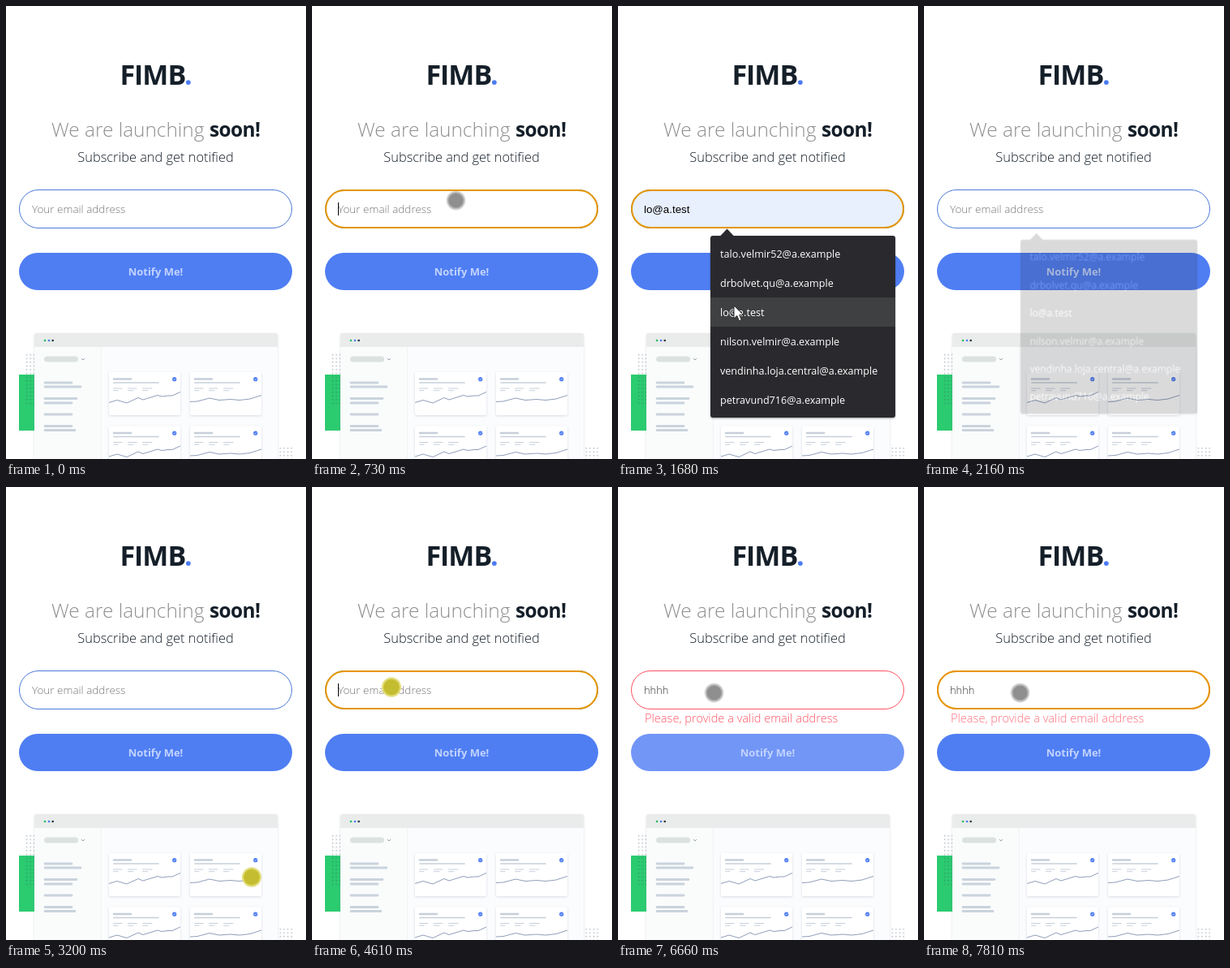
Recreate the animation shown at these times as an HTML page. Size 370 by 558 pixels, loop 8 s.

```html
<!DOCTYPE html>
<html lang="en">
<head>
<meta charset="utf-8">
<title>Launching soon</title>
<style>
html, body { margin: 0; width: 100%; height: 100%; overflow: hidden; background: #fff; }
svg { display: block; width: 370px; height: 558px; font-family: "Open Sans", sans-serif; }

.brand { font-weight: 700; font-size: 34px; letter-spacing: -1px; text-anchor: middle; fill: #151f29; }
.brand tspan { fill: #4c7bf3; }
.light { font-weight: 340; }
.lead { font-size: 24.4px; fill: #8e8e8e; }
.soon { font-size: 24.4px; font-weight: 700; letter-spacing: -.6px; fill: #151f29; }
.sub { font-size: 16.4px; text-anchor: middle; fill: #151f29; }
.hint { font-size: 13.5px; fill: #757575; }
.typed { font-size: 12.9px; fill: #333; }
.preview { font: 13.3px "Liberation Sans", Arial, sans-serif; }
.error { font-size: 14.6px; fill: #ff5263; }
.label { font-size: 13px; font-weight: 700; text-anchor: middle; fill: #c2d3ff; }
.popup text { font-size: 12.6px; fill: #fff; }

/* Hard switches */
.hint, .autofill, .opt1, .opt2, .opt3, .focus, .caret, .typing, .ring, .arrow, .press {
  animation: 8s step-end infinite;
}
.hint { animation-name: hint; }
.autofill { animation-name: autofill; }
.opt1 { animation-name: opt1; }
.opt2 { animation-name: opt2; }
.opt3 { animation-name: opt3; }
.focus { animation-name: focus; }
.caret { animation-name: caret; }
.typing { animation-name: typing; }
.ring { animation-name: ring; }
.arrow { animation-name: arrow; }
.press { animation-name: press; }

/* Smooth changes */
.field { animation: field 8s linear infinite; }
.error { animation: error 8s linear infinite; }
.button { animation: button 8s linear infinite; }
.popup { animation: popup 8s linear infinite; transform-origin: 228px 395px; }
.ring-path { animation: ring-path 8s ease-in-out infinite; }
.arrow-path { animation: arrow-path 8s linear infinite; }

@keyframes hint { 0%, 23.75% { opacity: 1 } 15%, 59.4%, 100% { opacity: 0 } }
@keyframes autofill { 0%, 23.75%, 100% { opacity: 0 } 15% { opacity: 1 } }
@keyframes opt1 { 0%, 16.9%, 100% { opacity: 0 } 15% { opacity: 1 } }
@keyframes opt2 { 0%, 19%, 100% { opacity: 0 } 16.9% { opacity: 1 } }
@keyframes opt3 { 0%, 23.75%, 100% { opacity: 0 } 19% { opacity: 1 } }
@keyframes focus { 0%, 26.1%, 67.8%, 100% { opacity: 0 } 8.2%, 57.55%, 91.3% { opacity: 1 } }
@keyframes caret {
  0%, 14.4% { opacity: 0; transform: none }
  8.2%, 57.55% { opacity: 1; transform: none }
  59.4% { opacity: 1; transform: translateX(7.6px) }
  60.5% { opacity: 1; transform: translateX(15.2px) }
  61.6% { opacity: 1; transform: translateX(22.8px) }
  62.7%, 91.3% { opacity: 1; transform: translateX(30px) }
  63.9%, 97.6%, 100% { opacity: 0; transform: translateX(30px) }
}
@keyframes typing {
  0% { width: 0 }
  59.4% { width: 7.8px }
  60.5% { width: 15.5px }
  61.6% { width: 23.2px }
  62.7%, 100% { width: 60px }
}
@keyframes ring { 0%, 14.4%, 26.2%, 100% { opacity: 0 } 2.4%, 23.75%, 28.8% { opacity: 1 } }
@keyframes arrow { 0%, 23.75%, 100% { opacity: 0 } 14.4% { opacity: 1 } }
@keyframes press {
  0%, 9%, 41.6%, 59.2%, 68.7%, 91.3%, 100% { opacity: 0 }
  7.4%, 40%, 57.55%, 67%, 89.85% { opacity: 1 }
}
@keyframes field { 0%, 68.7% { stroke: #4c7bd8 } 72.4%, 100% { stroke: #ff5263 } }
@keyframes error {
  0%, 68.7% { opacity: 0 }
  72.4%, 91.3% { opacity: 1 }
  95%, 100% { opacity: .85 }
}
@keyframes button {
  0%, 68.7%, 95%, 100% { fill: #4f7ef3 }
  72.4%, 91.3% { fill: #7296f6 }
}
@keyframes popup {
  0%, 10% { opacity: 0; transform: scale(.95) }
  11.6%, 26.1% { opacity: 1; transform: none }
  27% { opacity: .18; transform: scale(.956) }
  27.6%, 100% { opacity: 0; transform: scale(.95) }
}
@keyframes ring-path {
  0%, 2.4% { transform: translate(270px, 345px) }
  6.6%, 12.5% { transform: translate(177.5px, 239.5px) }
  14.4% { transform: translate(170px, 283px) }
  23.75% { transform: translate(110px, 362px); animation-timing-function: linear }
  24.2% { transform: translate(92px, 358px); animation-timing-function: linear }
  25.5% { transform: translate(3px, 288px); animation-timing-function: linear }
  26.2%, 28.8% { transform: translate(-15px, 280px) }
  32%, 32.8% { transform: translate(165px, 334px); animation-timing-function: ease-in }
  34.6% { transform: translate(252px, 385px); animation-timing-function: ease-out }
  37.2%, 43% { transform: translate(303px, 480.5px) }
  44.2% { transform: translate(311px, 498px) }
  47.6%, 60.2% { transform: translate(98px, 246.5px) }
  64.6%, 70% { transform: translate(138px, 356px) }
  76.5%, 80.8% { transform: translate(138px, 341px) }
  83.1%, 100% { transform: translate(118.5px, 253.5px) }
}
@keyframes arrow-path {
  0%, 14.4% { transform: translate(170px, 283px) }
  16.9% { transform: translate(162px, 323px) }
  19% { transform: translate(150px, 359px) }
  21%, 22.6% { transform: translate(143px, 369px) }
  23.75%, 100% { transform: translate(114px, 363px) }
}
</style>
</head>
<body>
<svg viewBox="0 0 370 558">
  <defs>
    <pattern id="dots" x="24" y="428" width="4.6" height="4.6" patternUnits="userSpaceOnUse">
      <circle cx="1.5" cy="1.5" r=".8" fill="#33495a" opacity=".4"/>
    </pattern>
    <clipPath id="typing"><rect class="typing" x="32" y="238" width="0" height="24"/></clipPath>
    <filter id="soft" x="-10%" y="-10%" width="120%" height="125%">
      <feDropShadow dx="0" dy="1" stdDeviation="1.6" flood-color="#8292a8" flood-opacity=".3"/>
    </filter>
    <filter id="lift" x="-5%" y="-5%" width="110%" height="110%">
      <feDropShadow dx="0" dy="1" stdDeviation="1" flood-opacity=".35"/>
    </filter>
    <g id="card" fill="none" stroke="#c6cfda" stroke-linecap="round">
      <rect width="88" height="53" rx="2" fill="#fff" stroke="none" filter="url(#soft)"/>
      <path d="M6 8.5H27" stroke-width="2.6"/>
      <path d="M6 13H61" stroke-width="1.7"/>
      <path d="M5.5 20H16M23.5 20H34M41.5 20H53M5.5 22.7H11M23.5 22.7H30M41.5 22.7H48" stroke-width="1"/>
      <circle cx="80.7" cy="8.7" r="2.6" fill="#4c7bf3" stroke="none"/>
      <path d="M79.6 8.8l.8.8 1.4-1.6" stroke="#fff" stroke-width=".6"/>
    </g>
    <path id="trend-a" d="M0 37.5L10 34.5 22 38 36 31.5 42 34 60 28.5 65 30 73 29 78 29 88 24.5"/>
    <path id="trend-b" d="M0 36.5L9 36 24 32 36 34.5 50 33.5 61 34.5 74 33 88 28.5"/>
  </defs>

  <text class="brand" x="184.5" y="97">FIMB<tspan>.</tspan></text>
  <text class="light lead" x="56" y="161">We are launching</text>
  <text class="soon" x="251" y="161">soon!</text>
  <text class="light sub" x="184.5" y="192">Subscribe and get notified</text>

  <!-- Dashboard picture -->
  <rect x="16" y="454" width="30" height="69" fill="#2bcb70"/>
  <rect x="24" y="428" width="14" height="63" fill="url(#dots)"/>
  <rect x="334" y="544" width="20" height="14" fill="url(#dots)"/>
  <g filter="url(#soft)">
    <rect x="35" y="403" width="300" height="175" rx="3" fill="#fafcfc"/>
  </g>
  <path d="M117 420H335V558H117Z" fill="#fbfcfd"/>
  <path d="M117.5 420V558" stroke="#f0f3f4"/>
  <path d="M35 420V406Q35 403 38 403H332Q335 403 335 406V420Z" fill="#e9ecea"/>
  <circle cx="48" cy="412" r="1.3" fill="#24bd63"/>
  <circle cx="53" cy="412" r="1.3" fill="#4c7bf3"/>
  <circle cx="57.7" cy="412" r="1.3" fill="#26333f"/>
  <rect x="47" y="431.5" width="42" height="7" rx="3.5" fill="#dce2e0"/>
  <path d="M93 434l2 2 2-2" fill="none" stroke="#8795a2" stroke-width=".9"/>
  <path d="M48 464H81M48 469H92M48 483.5H87M48 489H81M48 503H81M48 517.5H81M48 522.5H85"
    stroke="#cad3dd" stroke-width="2.8" stroke-linecap="round"/>
  <use href="#card" x="127" y="451"/>
  <use href="#card" x="227" y="451"/>
  <use href="#card" x="127" y="517.5"/>
  <use href="#card" x="227" y="517.5"/>
  <g fill="none" stroke="#8494b2" stroke-width=".9">
    <use href="#trend-a" x="127" y="451"/>
    <use href="#trend-b" x="227" y="451"/>
    <use href="#trend-a" x="127" y="517.5"/>
    <use href="#trend-b" x="227" y="517.5"/>
  </g>

  <!-- Form -->
  <rect class="field" x="16.5" y="226.5" width="336" height="47" rx="23.5" fill="#fff"/>
  <rect class="autofill" x="17" y="227" width="335" height="46" rx="23" fill="#e8f0fe"/>
  <rect class="focus" x="17" y="227" width="335" height="46" rx="23" fill="none" stroke="#e59700" stroke-width="2"/>
  <text class="light hint" x="32" y="255">Your email address</text>
  <g class="preview">
    <text class="opt1" x="32" y="255">talo.velmir52@a.example</text>
    <text class="opt2" x="32" y="255">drbolvet.qu@a.example</text>
    <text class="opt3" x="32" y="255">lo@a.test</text>
  </g>
  <g clip-path="url(#typing)"><text class="light typed" x="32" y="255">hhhh</text></g>
  <rect class="caret" x="32" y="242" width="1" height="16"/>
  <text class="light error" x="33" y="290">Please, provide a valid email address</text>
  <rect class="button" x="16" y="304" width="337" height="46" rx="23"/>
  <text class="label" x="184.5" y="331.7">Notify Me!</text>

  <!-- Suggestions -->
  <g class="popup">
    <g fill="#292a2d" filter="url(#lift)">
      <path d="M125.5 284L134.5 274.5 143.5 284Z"/>
      <rect x="114" y="283" width="228" height="224" rx="3"/>
    </g>
    <g fill="#3f4042">
      <rect class="opt1" x="114" y="287" width="228" height="36"/>
      <rect class="opt2" x="114" y="323" width="228" height="36"/>
      <rect class="opt3" x="114" y="359" width="228" height="36"/>
    </g>
    <text x="126" y="310">talo.velmir52@a.example</text>
    <text x="126" y="346">drbolvet.qu@a.example</text>
    <text x="126" y="382">lo@a.test</text>
    <text x="126" y="418">nilson.velmir@a.example</text>
    <text x="126" y="454">vendinha.loja.central@a.example</text>
    <text x="126" y="490">petravund716@a.example</text>
  </g>

  <!-- Pointers -->
  <g class="ring"><g class="ring-path">
    <circle r="11.5" fill="#a9a9a9" opacity=".7"/>
    <circle r="9.3" fill="#868686" opacity=".85"/>
    <g class="press">
      <circle r="12" fill="#e6e07a"/>
      <circle r="10" fill="#c5bd31"/>
    </g>
  </g></g>
  <g class="arrow"><path class="arrow-path" d="M0 0V16L3.8 12.5 6.4 18.8 9.2 17.6 6.6 11.6H11.6Z" fill="#fff" stroke="#222" stroke-width=".9"/></g>
</svg>
</body>
</html>
```
